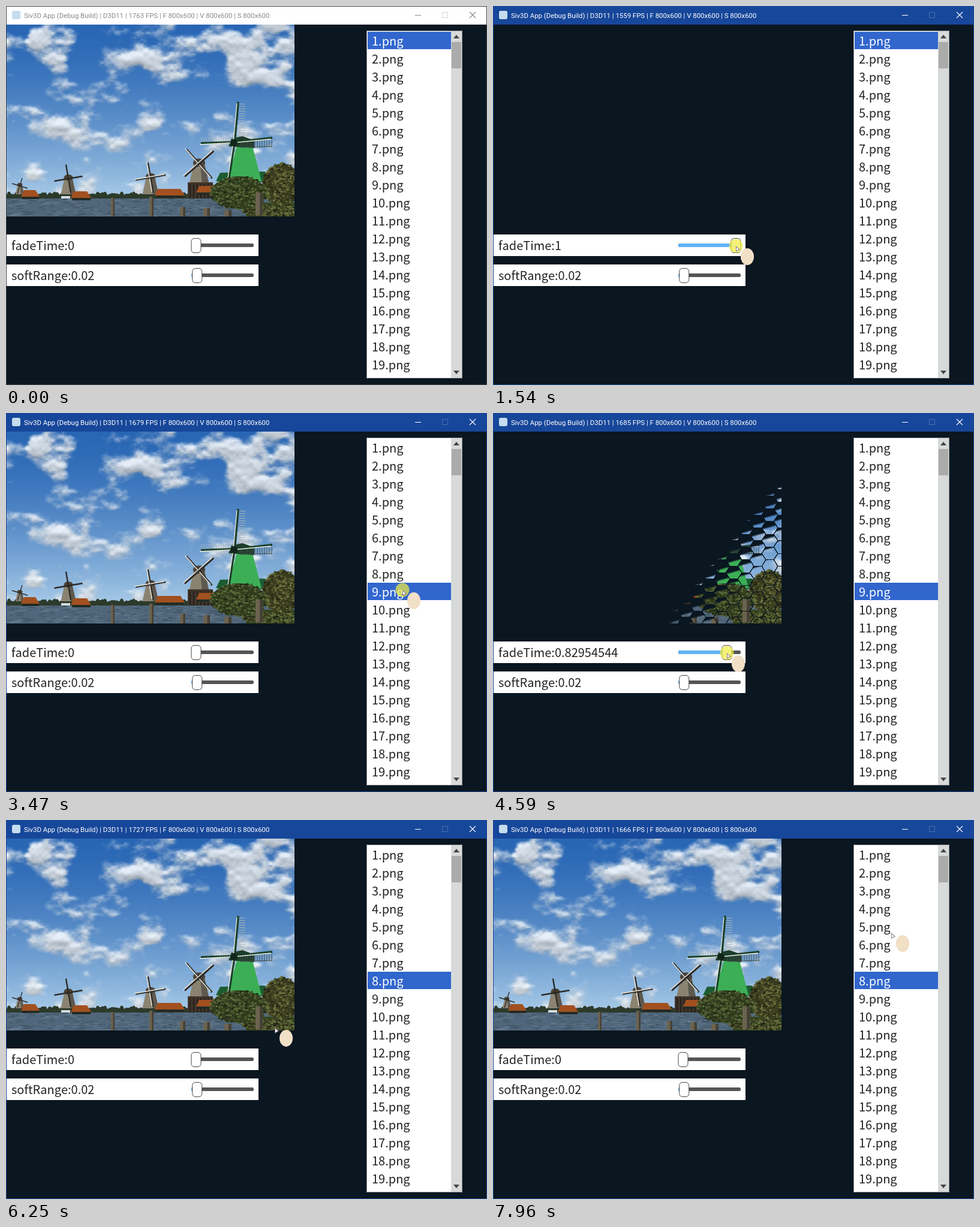
Recreate the animation shown at these times as an HTML page with a canvas. Size 802 by 632 pixels, loop 8000 ms.

```html
<!DOCTYPE html>
<html lang="en">
<head>
<meta charset="utf-8">
<title>Rule image transition</title>
<style>
html, body { margin: 0; width: 100%; height: 100%; overflow: hidden; background: #0a1620; }
canvas { display: block; }
</style>
</head>
<body>
<canvas id="stage" width="802" height="632"></canvas>
<script>
const LOOP = 8000, W = 480, H = 320, SOFT = 0.02, STEPS = 88;
const ctx = document.getElementById('stage').getContext('2d');
const clamp = (v, lo, hi) => Math.min(hi, Math.max(lo, v));
const mix = (a, b, f) => a + (b - a) * f;
const ease = f => f * f * (3 - 2 * f);

let seed = 7;
const rnd = () => (seed = (seed * 16807) % 2147483647) / 2147483647;

function layer() {
  const c = document.createElement('canvas');
  c.width = W;
  c.height = H;
  return c.getContext('2d', { willReadFrequently: true });
}
function rect(c, color, x, y, w, h) {
  c.fillStyle = color;
  c.fillRect(x, y, w, h);
}
function poly(c, color, ...p) {
  c.fillStyle = color;
  c.beginPath();
  for (let i = 0; i < p.length; i += 2) c.lineTo(p[i], p[i + 1]);
  c.closePath();
  c.fill();
}
function line(c, color, width, x1, y1, x2, y2) {
  c.strokeStyle = color;
  c.lineWidth = width;
  c.beginPath();
  c.moveTo(x1, y1);
  c.lineTo(x2, y2);
  c.stroke();
}
function oval(c, color, x, y, rx, ry) {
  c.fillStyle = color;
  c.beginPath();
  c.ellipse(x, y, rx, ry, 0, 0, Math.PI * 2);
  c.fill();
}
function rounded(c, color, x, y, w, h, r) {
  c.fillStyle = color;
  c.beginPath();
  c.roundRect(x, y, w, h, r);
  c.fill();
}

// ---- landscape ----
function hash(x, y) {
  const v = Math.sin(x * 127.1 + y * 311.7) * 43758.5453;
  return v - Math.floor(v);
}
function noise(x, y) {
  const ix = Math.floor(x), iy = Math.floor(y), fx = ease(x - ix), fy = ease(y - iy);
  return mix(mix(hash(ix, iy), hash(ix + 1, iy), fx), mix(hash(ix, iy + 1), hash(ix + 1, iy + 1), fx), fy);
}
function fractal(x, y) {
  let sum = 0;
  for (let i = 0, amp = 0.5; i < 5; i++, amp /= 2) sum += amp * noise(x * 2 ** i, y * 2 ** i);
  return sum;
}
const cloudMasses = [
  { x: 238, y: 48, rx: 100, ry: 56 }, { x: 430, y: 55, rx: 105, ry: 72 }, { x: 85, y: 30, rx: 42, ry: 42 },
  { x: 70, y: 172, rx: 58, ry: 27 }, { x: 241, y: 150, rx: 25, ry: 26 }
];
function cloudDensity(x, y) {
  let mass = Math.exp(-(((y - 222) / 55) ** 2)) - 0.8;
  for (const m of cloudMasses) mass = Math.max(mass, 1 - ((x - m.x) / m.rx) ** 2 - ((y - m.y) / m.ry) ** 2);
  return 1.5 * (fractal(x / 44 + 3, y / 28 + 9) - 0.48) + 0.32 * clamp(mass, -0.75, 0.8);
}
function paintSky(c) {
  const img = c.createImageData(W, H), density = new Float32Array(W * H);
  for (let i = 0; i < W * 292; i++) {
    const x = i % W, y = Math.floor(i / W);
    density[i] = cloudDensity(x, y);
    const cover = 0.94 * ease(clamp((density[i] + 0.1) / 0.42, 0, 1));
    const above = density[Math.max(i - 7 * W, x)];
    const light = clamp(212 + 130 * (density[i] - above), 150, 246);
    const depth = (y / 290) ** 1.5;
    [[40, 168, -6], [102, 203, 0], [180, 232, 6]].forEach(([top, low, tint], k) => {
      img.data[i * 4 + k] = mix(mix(top, low, depth), light + tint, cover);
    });
    img.data[i * 4 + 3] = 255;
  }
  c.putImageData(img, 0, 0);
}
function foliage(c, x, y, rx, ry, hue) {
  oval(c, `hsl(${hue} 36% 17%)`, x, y, rx, ry);
  for (let i = 0; i < 400; i++) {
    const a = rnd() * 6.283, r = Math.sqrt(rnd()) * 1.04;
    oval(c, `hsl(${hue} 30% ${10 + rnd() * 27}%)`, x + Math.cos(a) * r * rx, y + Math.sin(a) * r * ry, 2, 1.5);
  }
}
function sails(c, x, y, length, turn) {
  for (let i = 0; i < 4; i++) {
    const a = turn + i * Math.PI / 2, ex = x + Math.cos(a) * length, ey = y + Math.sin(a) * length;
    line(c, '#2c2a28', length / 10, x, y, ex, ey);
    if (length > 25) line(c, '#ebe7dc', 1.5, x - 2, y - 1, ex - 2, ey - 1);
  }
}
function mill(c, x, top, size, turn) {
  const half = size * 0.45;
  poly(c, '#8b8371', x - half * .5, top, x + half * .5, top, x + half, top + size, x - half, top + size);
  poly(c, '#5e594f', x + half * .1, top, x + half * .5, top, x + half, top + size, x + half * .3, top + size);
  oval(c, '#4c4338', x, top, half * .6, half * .4);
  sails(c, x, top + 2, size * .85, turn);
}
function house(c, x, y, w) {
  poly(c, '#a2501f', x + 5, y, x + w - 7, y, x + w, y + 11, x, y + 11);
  rect(c, '#222b25', x + 2, y + 11, w - 3, 4);
}
function greenMill(c) {
  poly(c, '#1d5c32', 350, 292, 357, 278, 432, 276, 441, 294);
  poly(c, '#3caf56', 385, 234, 411, 234, 426, 292, 368, 292);
  poly(c, '#1d3d2a', 371, 234, 376, 221, 394, 217, 414, 224, 414, 237);
  for (let i = 0; i < 14; i++) {
    const d = i * 4;
    line(c, '#aab6b8', 1, 388, 163 + d, 399, 164 + d);
    line(c, '#aab6b8', 1, 326 + d, 219, 327 + d, 229);
    line(c, '#46504c', 1, 391 + d, 224, 391 + d, 236);
  }
  line(c, '#46504c', 1, 391, 236, 444, 234);
  for (const [x, y] of [[387, 160], [325, 229], [444, 220], [371, 291]]) {
    line(c, '#193f2a', 4, 381, 227, x, y);
    line(c, '#eceee6', 1.3, 379, 228, x - 2, y + 2);
  }
  oval(c, '#10261a', 380, 228, 6, 6);
}
function paintScene() {
  const c = layer();
  paintSky(c);
  c.translate(-1, -31);

  for (let x = 1; x < 481; x += 4) oval(c, '#2c3a2b', x, 318, 4, 3 + rnd() * 6);
  rect(c, '#50667a', 1, 321, W, 30);
  for (let i = 0; i < 400; i++) {
    rect(c, i % 2 ? 'rgba(140,160,178,.35)' : 'rgba(34,50,64,.4)', rnd() * W, 321 + rnd() * 29, 4 + rnd() * 10, 1);
  }

  mill(c, 23, 298, 16, .3);
  mill(c, 104, 286, 28, 1.4);
  mill(c, 241, 284, 30, 1.4);
  mill(c, 322, 261, 38, .85);
  house(c, 25, 307, 31);
  house(c, 108, 309, 34);
  house(c, 248, 305, 50);
  rect(c, '#d5dcde', 92, 317, 15, 4);
  rect(c, '#42342a', 303, 294, 42, 26);
  for (let x = 306; x < 345; x += 6) rect(c, '#1f211c', x, 297, 2, 24);
  house(c, 317, 300, 38);
  greenMill(c);

  rect(c, '#35451d', 400, 328, 81, 23);
  foliage(c, 445, 342, 50, 9, 72);
  foliage(c, 460, 298, 32, 35, 66);
  foliage(c, 388, 311, 46, 27, 82);
  for (const [x, y, w] of [[175, 320, 6], [239, 318, 7], [290, 335, 9], [329, 337, 11], [364, 340, 12], [416, 311, 12]]) {
    rect(c, '#6c634f', x, y, w, Math.min(26, 351 - y) + w);
    rect(c, '#454036', x + w * .6, y, w * .4, Math.min(26, 351 - y) + w);
  }
  return c.getImageData(0, 0, W, H);
}

// ---- rules: level at which each point disappears ----
function spikes(x, y) {
  const edge = Math.min(x, W - x) / 240;
  const band = Math.abs((y + 13) % 16 - 8) / 8;
  return 0.08 + 0.363 * edge + 0.55 * (1 - band);
}
function hexagons(x, y) {
  const pitchX = 20, pitchY = H / 15, apothem = pitchY / 2;
  const near = Math.round(x / pitchX);
  let best = { d: Infinity };
  for (let col = near - 1; col <= near + 1; col++) {
    const shift = (col & 1) / 2;
    const cx = col * pitchX, cy = (Math.round(y / pitchY - shift) + shift) * pitchY;
    const dx = (x - cx) * 0.924, dy = y - cy;
    const d = Math.max(Math.abs(dy), Math.abs(dy) / 2 + Math.abs(dx) * 0.866);
    if (d < best.d) best = { d, cx, cy, dx, dy };
  }
  const local = 0.045 + 0.07 * (0.3 * best.dx + best.dy) / apothem;
  const level = clamp((best.cx + 0.8 * best.cy) / 736 + local, 0, 1);
  return best.d > apothem * 0.94 ? level * 0.8 : level;
}
const buildRule = fn => Float32Array.from({ length: W * H }, (_, i) => clamp(fn(i % W, Math.floor(i / W)), 0, 1));
const rules = {
  1: buildRule(spikes),
  8: buildRule((x, y) => hexagons(W - x, y)),
  9: buildRule(hexagons)
};

const scene = paintScene();
const view = layer();
let shown = '';
function drawScene(rule, fade) {
  const key = rule + ':' + fade;
  if (key !== shown) {
    shown = key;
    const p = fade * (1 + SOFT);
    rules[rule].forEach((level, i) => {
      scene.data[i * 4 + 3] = 255 * clamp((level - p) / SOFT + 1, 0, 1);
    });
    view.putImageData(scene, 0, 0);
  }
  ctx.drawImage(view.canvas, 1, 31);
}

// ---- pointer: stops on the slider (drag) or the list (pick), eased moves between ----
const grip = { x: 317, y: 400 };
const stops = [
  { from: 180, to: 180, x: 812, y: 612 },
  { from: 756, to: 2389, drag: true, ...grip },
  { from: 3300, to: 3480, pick: 9, x: 661, y: 295 },
  { from: 4150, to: 5357, drag: true, ...grip },
  { from: 5970, to: 5990, pick: 8, x: 661, y: 258 },
  { from: 6440, to: 7560, drag: true, ...grip },
  { from: 7960, to: LOOP, x: 664, y: 188 }
];
const frameRates = [1763, 1707, 1559, 1634, 1679, 1685, 1727, 1692, 1666];

function stateAt(t) {
  const past = stops.filter(s => s.from <= t);
  const rule = past.reduce((r, s) => s.pick || r, 1);
  const stop = past[past.length - 1];
  if (!stop) return { rule, steps: 0 };
  if (t < stop.to) {
    const swing = stop.drag ? Math.sin(Math.PI * (t - stop.from) / (stop.to - stop.from)) ** 2 : 0;
    const steps = Math.round(STEPS * swing);
    return { rule, steps, cursor: { x: stop.x + steps, y: stop.y, down: stop.drag || stop.pick } };
  }
  const next = stops[past.length];
  const f = ease((t - stop.to) / (next.from - stop.to));
  return { rule, steps: 0, cursor: { x: mix(stop.x, next.x, f), y: mix(stop.y, next.y, f) } };
}

// ---- window parts ----
function text(str, x, y, color, font = '20px "Noto Sans CJK JP", "Noto Sans", sans-serif') {
  ctx.font = font;
  ctx.fillStyle = color;
  ctx.fillText(str, x, y);
}
function outline(color, x, y, w, h, r = 0) {
  ctx.strokeStyle = color;
  ctx.lineWidth = 1;
  ctx.beginPath();
  ctx.roundRect(x, y, w, h, r);
  ctx.stroke();
}
function titleBar(active, fps) {
  const ink = active ? '#fff' : '#888';
  rect(ctx, active ? '#17479a' : '#fff', 0, 0, 802, 31);
  outline(active ? '#17479a' : '#3c444c', .5, .5, 801, 631);
  rounded(ctx, '#c4dcee', 10, 8, 14, 14, 3);
  text(`Siv3D App (Debug Build) | D3D11 | ${fps} FPS | F 800x600 | V 800x600 | S 800x600`,
    30, 20, ink, '11.4px Roboto, sans-serif');
  line(ctx, ink, 1, 682, 15.5, 692, 15.5);
  outline(active ? '#4a70b0' : '#d4d4d4', 727.5, 10.5, 9, 9);
  line(ctx, ink, 1.1, 773, 10, 783, 20);
  line(ctx, ink, 1.1, 783, 10, 773, 20);
}
function slider(label, value, y) {
  const knob = grip.x + value * STEPS;
  rect(ctx, '#fff', 1, y, 420, 36);
  text(`${label}:${value}`, 9, y + 26, '#222');
  rounded(ctx, '#555', 309, y + 15, 104, 6, 2.5);
  rounded(ctx, '#62b2f6', 309, y + 15, knob - 309, 6, 2.5);
  rounded(ctx, '#fff', knob - 8, y + 6.5, 16, 24, 5);
  outline('#444', knob - 8, y + 6.5, 16, 24, 5);
}
function listBox(selected) {
  rect(ctx, '#fff', 601, 41, 160, 580);
  outline('#8a8e92', 601.5, 41.5, 159, 579);
  for (let i = 1; i <= 19; i++) {
    const y = 13 + i * 30;
    if (i === selected) rect(ctx, '#3166cd', 603, y, 139, 29);
    text(i + '.png', 610, y + 23, i === selected ? '#fff' : '#222');
  }
  rect(ctx, '#d7dad9', 742, 42, 18, 578);
  rect(ctx, '#ababab', 743, 60, 16, 44);
  poly(ctx, '#444', 746, 54, 751, 48, 756, 54);
  poly(ctx, '#444', 746, 608, 751, 614, 756, 608);
}
function pointer({ x, y, down }) {
  if (down) oval(ctx, 'rgba(240,236,70,.72)', x, y, 11.5, 11.5);
  oval(ctx, '#f1dfc6', x + 19, y + 18, 11, 14);
  poly(ctx, '#8d7d90', x, y, x + 7, y + 6, x, y + 10);
  poly(ctx, '#fff', x + 1, y + 2, x + 5, y + 6, x + 1, y + 8);
}

function draw(now) {
  const t = now % LOOP;
  const { rule, steps, cursor } = stateAt(t);
  const fade = +Math.fround(steps / STEPS).toFixed(8);

  ctx.fontKerning = 'none';
  rect(ctx, '#0a1620', 0, 0, 802, 632);
  titleBar(t >= stops[1].from, frameRates[Math.floor((t + 640) / 1000)]);
  drawScene(rule, fade);
  slider('fadeTime', fade, 381);
  slider('softRange', SOFT, 431);
  listBox(rule);
  if (cursor) pointer(cursor);
  requestAnimationFrame(draw);
}
requestAnimationFrame(draw);
</script>
</body>
</html>
```
